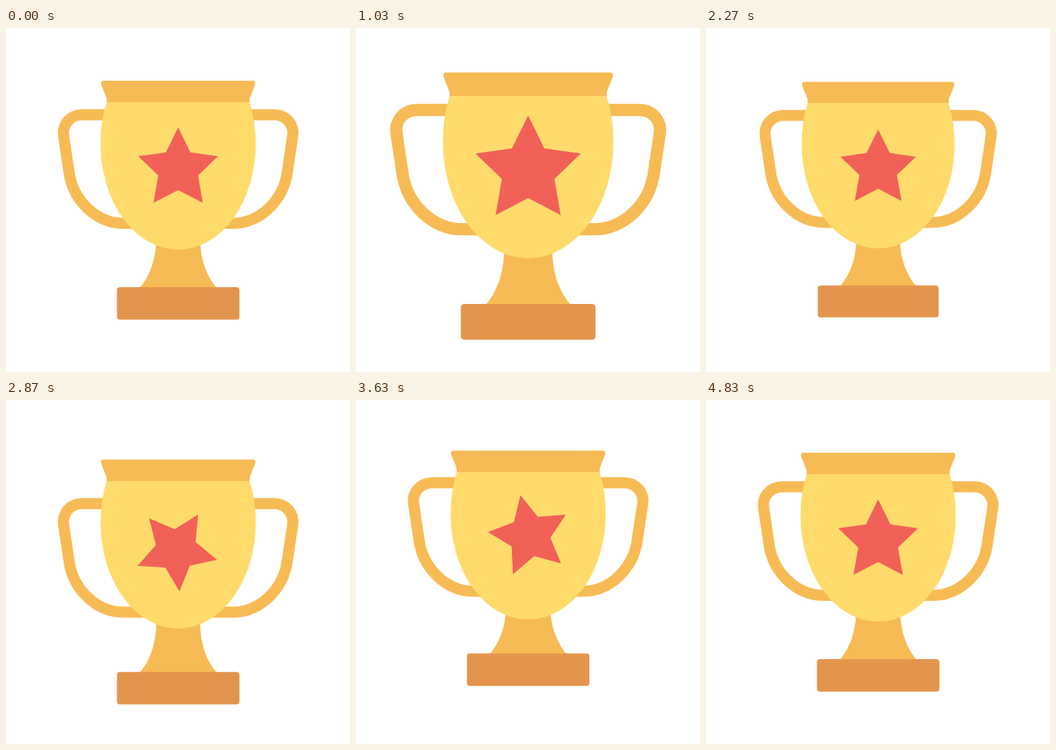
An HTML page for the animation above (4.86 s loop, 448 by 450 pixels).

```html
<!DOCTYPE html>
<html lang="en">
<head>
<meta charset="utf-8">
<title>Trophy</title>
<style>
  html, body { margin: 0; width: 100%; height: 100%; overflow: hidden; background: #fff; }
  svg { display: block; width: 100vw; height: 100vh; }
</style>
</head>
<body>
<svg viewBox="0 0 448 450">
  <defs>
    <path id="handle" d="M150 113.5H99C84 113.5 73 126 75 141L82 188C87 226 118 255.5 153 255.5H190"
          fill="none" stroke="#f7bb55" stroke-width="14.5"/>
  </defs>
  <g id="left"><use href="#handle"/></g>
  <g id="right"><use href="#handle" transform="matrix(-1 0 0 1 448.4 0)"/></g>
  <g id="foot">
    <path d="M174 340Q193 318 195.5 282L196 250H252.4L253 282Q255.400 318 274.400 340Z" fill="#f7bb55"/>
    <rect x="144.5" y="339" width="159.5" height="42.500" rx="4" fill="#e4954d"/>
  </g>
  <g id="cup">
    <path d="M131.400 96H317A101 138 0 0 1 325.200 152A101 138 0 0 1 123.200 152A101 138 0 0 1 131.400 96Z" fill="#ffdb6b"/>
    <path d="M127 69H321.400Q325.500 69 324.500 74L317.400 92V97H131V92L123.900 74Q122.900 69 127 69Z" fill="#f7bb55"/>
  </g>
  <polygon id="star" fill="#f26158"/>
</svg>
<script>
const LOOP = 4860, FPS = 30, CX = 224.2, CY = 177, STAR_Y = 180;

// Each track lists [ms, value] keys joined by an ease in and out.
const tracks = {
  scale:       [[240, 1], [960, 1.105], [1690, .903], [2448, 1]],
  handleOut:   [[110, 0], [710, 17], [1500, -9], [2250, 0]],
  footStretch: [[40, 0], [890, 8], [1600, -12], [2280, 0]],
  starScale:   [[350, 1], [1090, 1.205], [1850, .84], [2470, 1]],
  cupY:        [[2525, 0], [3260, 20], [3920, -18], [4820, 0]],
  handleY:     [[2500, 0], [3125, 35], [3980, -28], [4750, 0]],
  footY:       [[2500, 0], [3125, 26.5], [3980, -26.5], [4730, 0]],
  starY:       [[2500, 0], [3140, 20], [4200, -20], [4830, 0]]
};
const SPIN = { start: 2460, end: 4830 };

const smooth = u => u * u * (3 - 2 * u);
const clamp = u => Math.min(1, Math.max(0, u));

function valueAt(keys, t) {
  let value = keys[0][1];
  for (let i = 1; i < keys.length; i++) {
    const [t0, v0] = keys[i - 1], [t1, v1] = keys[i];
    if (t >= t0) value = v0 + (v1 - v0) * smooth(clamp((t - t0) / (t1 - t0)));
  }
  return value;
}

// cubic-bezier(.33, 0, .55, 1), solved by bisection
function spinEase(x) {
  let low = 0, high = 1;
  for (let i = 0; i < 24; i++) {
    const s = (low + high) / 2, r = 1 - s;
    if (.99 * r * r * s + 1.65 * r * s * s + s ** 3 < x) low = s; else high = s;
  }
  return smooth(low);
}

const el = id => document.getElementById(id);
const parts = Object.fromEntries(['left', 'right', 'foot', 'cup', 'star'].map(id => [id, el(id)]));

parts.star.setAttribute('points', Array.from({ length: 10 }, (_, i) => {
  const r = i % 2 ? 27.2 : 54.6, a = i * Math.PI / 5;
  return `${r * Math.sin(a)},${4.7 - r * Math.cos(a)}`;
}).join(' '));

function place(part, scale, dx, dy) {
  part.setAttribute('transform',
    `translate(${CX * (1 - scale) + dx} ${CY * (1 - scale) + dy}) scale(${scale})`);
}

function draw(ms) {
  const t = Math.floor((ms % LOOP + 4) * FPS / 1000) * 1000 / FPS;
  const v = {};
  for (const name in tracks) v[name] = valueAt(tracks[name], t);

  place(parts.left, v.scale, -v.handleOut, v.handleY);
  place(parts.right, v.scale, v.handleOut, v.handleY);
  place(parts.foot, v.scale, 0, v.footStretch + v.footY);
  place(parts.cup, v.scale, 0, v.cupY);

  const turn = 360 * spinEase(clamp((t - SPIN.start) / (SPIN.end - SPIN.start)));
  const y = CY + (STAR_Y - CY) * v.scale + v.starY;
  parts.star.setAttribute('transform',
    `translate(${CX} ${y}) rotate(${turn}) scale(${v.scale * v.starScale})`);
}

const begin = performance.now();
function tick() {
  draw(performance.now() - begin);
  requestAnimationFrame(tick);
}
tick();
</script>
</body>
</html>
```
